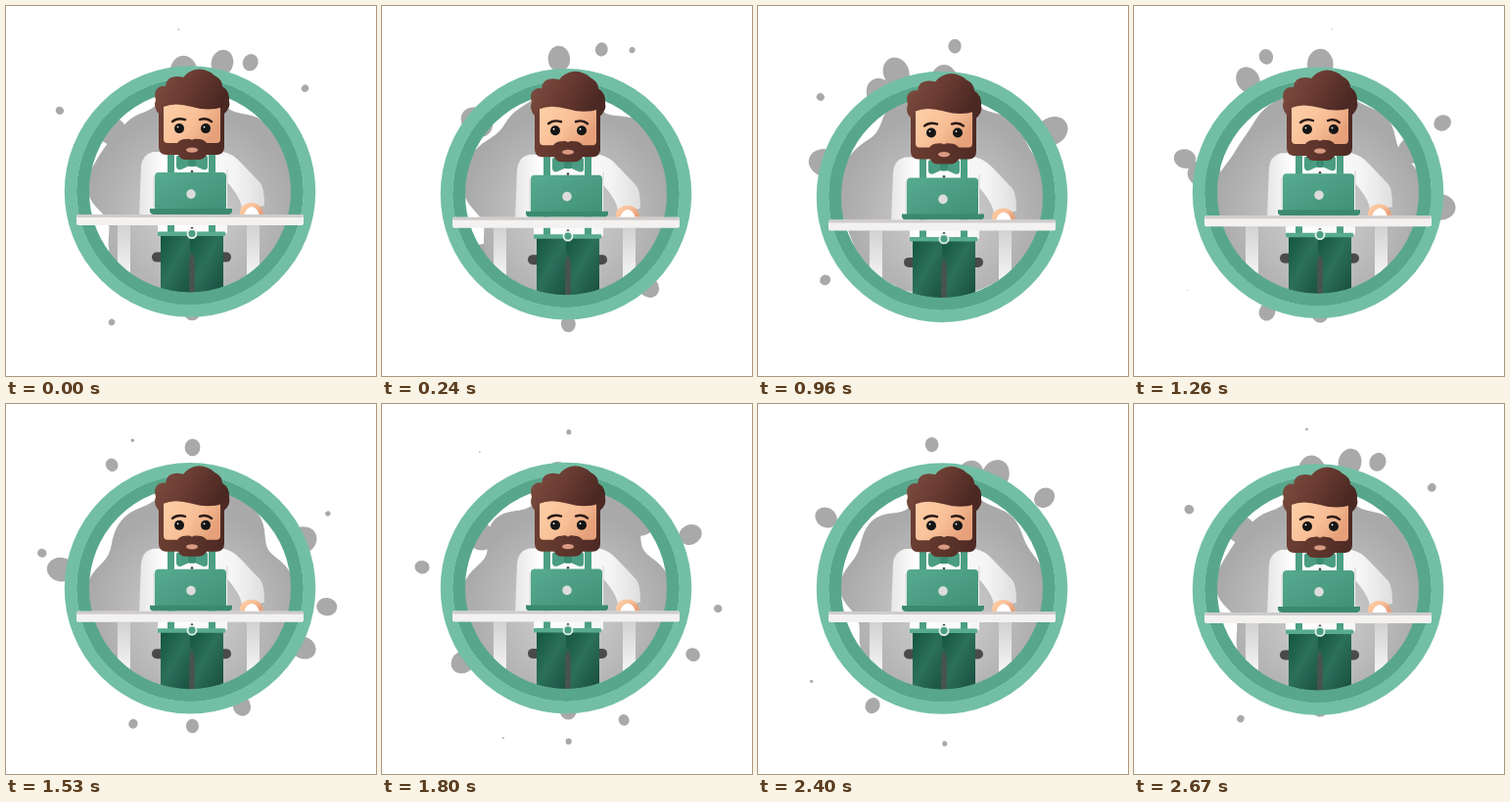
Recreate the animation shown at these times as an HTML page. Size 378x378 px, loop 2.7 s.

```html
<!DOCTYPE html>
<html lang="en">
<head>
<meta charset="utf-8">
<title>At the desk</title>
<style>
html, body { margin: 0; width: 100%; height: 100%; overflow: hidden; background: #fff; }
svg { display: block; width: 100vw; height: 100vh; }
</style>
</head>
<body>
<svg viewBox="0 0 378 378">
  <defs>
    <radialGradient id="grey" gradientUnits="userSpaceOnUse" cx="190" cy="215" r="108">
      <stop offset="0" stop-color="#d2d2d2"/>
      <stop offset=".55" stop-color="#bcbcbc"/>
      <stop offset="1" stop-color="#a9a9a9"/>
    </radialGradient>
    <linearGradient id="hair" x2="1" y2=".35">
      <stop offset="0" stop-color="#805044"/>
      <stop offset=".5" stop-color="#6b3c32"/>
      <stop offset="1" stop-color="#4b2823"/>
    </linearGradient>
    <linearGradient id="beard">
      <stop offset="0" stop-color="#6c3e32"/>
      <stop offset="1" stop-color="#4d2a24"/>
    </linearGradient>
    <linearGradient id="skin" x2="1" y2=".5">
      <stop offset="0" stop-color="#ffd0a8"/>
      <stop offset=".6" stop-color="#f8bf97"/>
      <stop offset="1" stop-color="#e6a17a"/>
    </linearGradient>
    <linearGradient id="shirt">
      <stop offset="0" stop-color="#e6e6e6"/>
      <stop offset=".2" stop-color="#fff"/>
      <stop offset=".75" stop-color="#f5f5f5"/>
      <stop offset="1" stop-color="#dedede"/>
    </linearGradient>
    <linearGradient id="pants" x2="1" y2="1">
      <stop offset="0" stop-color="#14553f"/>
      <stop offset=".45" stop-color="#2b705a"/>
      <stop offset="1" stop-color="#184c3c"/>
    </linearGradient>
    <linearGradient id="lid" x2="1" y2="1">
      <stop offset="0" stop-color="#57ab90"/>
      <stop offset="1" stop-color="#3f9076"/>
    </linearGradient>
    <linearGradient id="leg" x2="0" y2="1">
      <stop offset="0" stop-color="#d2d2d2"/>
      <stop offset="1" stop-color="#f7f7f7"/>
    </linearGradient>
    <clipPath id="hole"><circle cx="188" cy="189.500" r="103.500"/></clipPath>
  </defs>

  <g fill="#a9a9a9" id="drops"></g>
  <path id="blob" fill="url(#grey)"/>

  <g id="scene">
    <g clip-path="url(#hole)">
      <rect x="149" y="251.500" width="81" height="10" rx="5" fill="#4a4a4a"/>
      <path fill="url(#leg)" d="M114 224h13v54h-13zM246 224h13v54h-13z"/>
      <path fill="#45544e" d="M184 240h14v55h-14z"/>
      <path fill="url(#pants)" d="M158 234H192V250Q187 254 187 264V295H158z"/>
      <path fill="url(#pants)" d="M188 234H222V295H193V264Q193 254 188 250z"/>
    </g>
    <circle cx="188" cy="189.500" r="109.500" fill="none" stroke="#58a78c" stroke-width="13"/>
    <circle cx="188" cy="189.500" r="122" fill="none" stroke="#72bfa5" stroke-width="12.500"/>

    <path fill="url(#shirt)" d="M150 149H222Q232 151 240 160L260 181Q264 186 264 204L241 208Q241 197 226 180V232H155V215H136L138 164Q139 152 150 149z"/>
    <path fill="none" stroke="#d2d2d2" d="M151 174V206M226 167V180"/>
    <path fill="#4c9f84" d="M165 149h7v84h-7zM207 149h7v84h-7z"/>
    <g fill="#444"><circle cx="190" cy="169" r="1.300"/><circle cx="190" cy="227" r="1.300"/></g>
    <rect x="155" y="230.500" width="69" height="4.500" rx="1" fill="#58ab90"/>
    <circle cx="190" cy="232.500" r="4.500" fill="#4c9f84" stroke="#e8f2ee" stroke-width="1.800"/>

    <path fill="url(#skin)" d="M239 213Q238 203 249 201Q262 201 263 213z"/>
    <path fill="#fff" d="M243 214Q245 206 251 205Q257 206 259 214z"/>

    <rect x="152" y="170" width="73" height="40" rx="4" fill="url(#lid)"/>
    <path fill="#3b8a70" d="M147 207H231V210Q230 213 227 213H151Q148 213 147 210z"/>
    <circle cx="189" cy="192" r="4.800" fill="#dcdcdc"/>
    <rect x="72" y="213" width="232" height="11" rx="2" fill="#f3f2f1"/>
    <path fill="#cfcccb" d="M73 213H303L304 216H72z"/>
  </g>

  <g id="head">
    <path fill="#4a9d82" d="M190 158L177 153Q174 152 174 155V164Q175 168 179 167L190 162L201 167Q206 168 206 164V155Q206 152 203 153z"/>
    <rect x="186" y="156" width="8" height="8" rx="2" fill="#3b8c72"/>
    <path fill="url(#beard)" d="M156 98H223V144Q223 151 216 152H205Q202 157 196 157H184Q178 157 176 152H163Q156 151 156 144z"/>
    <path fill="url(#skin)" d="M161 98H219V136Q219 140 215 140H205Q202 136 197 136Q192 135 190 137Q188 135 183 136Q178 136 175 140H165Q161 140 161 136z"/>
    <ellipse cx="190" cy="147" rx="6" ry="2.600" fill="#d99a83"/>
    <path fill="url(#hair)" d="M156 110Q150 103 153 96Q150 87 156 83Q160 81 163 82Q164 72 174 72Q179 72 181 73Q187 65 197 64.500Q207 65 213 71Q221 75 221 82Q229 87 228 97Q230 104 222 111V103Q207 108 190 103Q172 98 161 103V110z"/>
    <g fill="#151515"><circle cx="177" cy="125" r="5"/><circle cx="204" cy="125" r="5"/></g>
    <g fill="#fff"><circle cx="175.500" cy="123.500" r=".9"/><circle cx="202.500" cy="123.500" r=".9"/></g>
    <path fill="none" stroke="#2b1a17" stroke-width="2.400" stroke-linecap="round" d="M170 118Q175 113.500 183 116M198 116Q205 113.500 210 118"/>
  </g>
</svg>
<script>
const LOOP = 2700, STEP = 30, CX = 188, CY = 190, RING = 128;
const SPEED = 0.058, LIFE = 700;
const { PI, sin, cos, exp, max, min } = Math;
const $ = id => document.getElementById(id);
const rad = deg => deg * PI / 180;

// Dents in the blob: direction and the phase at which each is deepest, in degrees
const dents = [[160, 0], [203, 250], [222, 88], [245, 293], [297, 60], [332, 230]];

// Drops: direction in degrees and the time each one leaves the ring
const drops = [
  [267, 100], [89, 120], [49, 235], [218, 450], [275, 590], [143, 590],
  [249, 915], [331, 960], [194, 1050], [238, 1140], [271, 1225], [113, 1175],
  [7, 1310], [89, 1340], [189, 1440], [27, 1500], [66, 1500], [336, 1610],
  [145, 1800], [89, 1900], [266, 2040], [318, 2180], [212, 2200], [121, 2230],
  [295, 2390], [284, 2560]
].map(([angle, leave]) => {
  const el = document.createElementNS('http://www.w3.org/2000/svg', 'ellipse');
  el.setAttribute('transform', `translate(${CX} ${CY}) rotate(${angle})`);
  $('drops').append(el);
  return { el, leave, size: 14 - 5 * max(0, sin(rad(angle))) };
});

function drawBlob(phase) {
  let d = '';
  for (let deg = 0; deg < 360; deg += 3) {
    let r = 107;
    for (const [at, peak] of dents) {
      const depth = 9 * (1 + cos(phase - rad(peak)));
      r -= depth * exp(-(((deg - at) / 14) ** 2));
    }
    const a = rad(deg);
    d += `${d ? 'L' : 'M'}${CX + r * cos(a)} ${CY + r * sin(a)}`;
  }
  $('blob').setAttribute('d', d + 'z');
}

function drawDrop({ el, leave, size }, t) {
  const age = (t - leave + 1.5 * LOOP) % LOOP - LOOP / 2;
  const dist = RING + age * SPEED;
  const r = dist < 100 ? 0 : size * max(0, min(1, 1 - age / LIFE));
  el.setAttribute('cx', dist);
  el.setAttribute('rx', r * (1 + r / 60));
  el.setAttribute('ry', r);
}

function draw(now) {
  const t = Math.floor(now % LOOP / STEP) * STEP;
  const phase = t / LOOP * 2 * PI;
  const bob = 1.5 + 4 * sin(phase) - 1.45 * cos(2 * phase - 0.28);
  $('scene').setAttribute('transform', `translate(0 ${bob})`);
  $('head').setAttribute('transform', `translate(0 ${bob * 0.85})`);
  drawBlob(phase);
  drops.forEach(drop => drawDrop(drop, t));
}

const start = performance.now();
function tick() {
  draw(performance.now() - start);
  requestAnimationFrame(tick);
}
tick();
</script>
</body>
</html>
```
